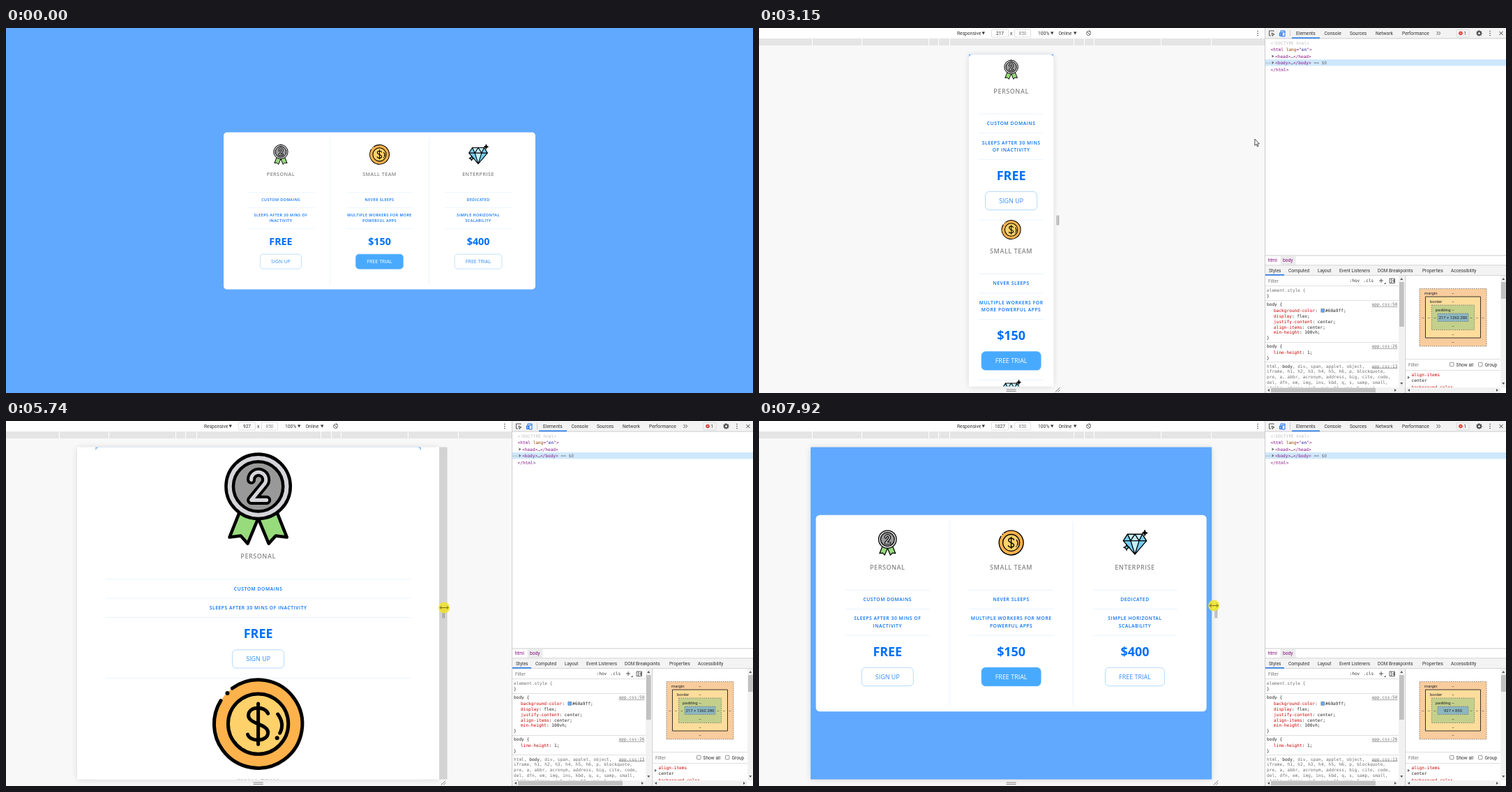
Animation of 1071x523 px, one loop 8000 ms. Source, as an HTML page with a canvas:

```html
<!DOCTYPE html>
<html lang="en">
<head>
<meta charset="utf-8">
<title>Responsive pricing panel</title>
<style>
html, body { margin: 0; width: 100%; height: 100%; overflow: hidden; background: #60a9ff; }
canvas { display: block; }
</style>
</head>
<body>
<canvas id="stage" width="1071" height="523"></canvas>
<script>
const c = document.getElementById('stage').getContext('2d');
const LOOP = 8000, ZOOM = 0.56, MID = 361.6, TOP = 37.5, VIEW_H = 850;
const SANS = 'Roboto, sans-serif', OPEN = '"Open Sans", sans-serif', MONO = '"DejaVu Sans Mono", monospace';
const BLUE = '#60a9ff', RULE = '#e1f1ff', GRAY = '#6e6e6e', DARK = '#333', EDGE = '#ccc', PURPLE = '#881280';

const PLANS = [
  { name: 'PERSONAL', icon: medal, price: 'FREE', button: 'SIGN UP',
    features: ['CUSTOM DOMAINS', 'SLEEPS AFTER 30 MINS OF INACTIVITY'] },
  { name: 'SMALL TEAM', icon: coin, price: '$150', button: 'FREE TRIAL', featured: true,
    features: ['NEVER SLEEPS', 'MULTIPLE WORKERS FOR MORE POWERFUL APPS'] },
  { name: 'ENTERPRISE', icon: diamond, price: '$400', button: 'FREE TRIAL',
    features: ['DEDICATED', 'SIMPLE HORIZONTAL SCALABILITY'] }
];

// [time, value...] keys, linear in between
const POINTER = [[360, 93, 33], [980, 648, 120], [1130, 604, 114], [1210, 616, 103], [1280, 635, 91],
  [1680, 635, 91], [2450, 674, 277], [2990, 674, 277], [3300, 745, 50], [3630, 709, 140],
  [3780, 709, 140], [3790, 697, 166], [4230, 425, 275]];
const WIDTH = [[5020, 217], [5090, 231], [5740, 927], [5870, 934], [6650, 1180], [6980, 1211],
  [7200, 1205], [7540, 1148], [7920, 1027]];
const GRIP = [[4850, 3, 275], [5090, 5, 275], [5740, 7, 267.5], [6980, 5, 265], [7920, 3, 264.5]];

function at(keys, t) {
  if (t <= keys[0][0]) return keys[0].slice(1);
  const i = keys.findIndex(k => k[0] > t);
  if (i < 0) return keys[keys.length - 1].slice(1);
  const a = keys[i - 1], b = keys[i], p = (t - a[0]) / (b[0] - a[0]);
  return a.slice(1).map((v, n) => v + (b[n + 1] - v) * p);
}

function rect(x, y, w, h, color) { c.fillStyle = color; c.fillRect(x, y, w, h); }
function box(x, y, w, h, r, fill, stroke, lw = 1) {
  c.beginPath(); c.roundRect(x, y, w, h, r);
  if (fill) { c.fillStyle = fill; c.fill(); }
  if (stroke) { c.strokeStyle = stroke; c.lineWidth = lw; c.stroke(); }
}
function shape(d, fill, stroke, lw = 1) {
  const p = new Path2D(d);
  if (fill) { c.fillStyle = fill; c.fill(p); }
  if (stroke) { c.strokeStyle = stroke; c.lineWidth = lw; c.stroke(p); }
}
function disc(x, y, r, fill, stroke, lw) { box(x - r, y - r, 2 * r, 2 * r, r, fill, stroke, lw); }
function setFont(size, font, weight, gap) {
  c.font = `${weight} ${size}px ${font}`;
  c.letterSpacing = gap + 'px';
}
// y is the middle of the capitals
function text(s, x, y, size, color, { font = SANS, weight = 400, align = 'left', gap = 0 } = {}) {
  setFont(size, font, weight, gap);
  c.textAlign = align;
  c.fillStyle = color;
  c.fillText(s, x, y + size * 0.36);
  return c.measureText(s).width;
}
function moved(x, y, scale, draw) {
  c.save(); c.translate(x, y); c.scale(scale, scale); draw(); c.restore();
}

// Icons are drawn around 0,0 in a box of 131 units
function medal() {
  shape('M-27 20L-41 55L-25 53L-15 64L0 28L15 64L25 53L41 55L27 20Z', '#98db7c', '#000', 4.5);
  disc(0, -17.5, 46, '#d5d5da', '#000', 4.5);
  disc(0, -17.5, 35.5, '#999', '#000', 4.5);
  const two = 'M-10 -27A10.5 10.5 0 1 1 8 -20L-10 2H12';
  shape(two, null, '#000', 13);
  shape(two, null, '#d5d5da', 5);
}
function coin() {
  disc(0, 0, 63, '#feb24c');
  c.beginPath(); c.arc(0, 0, 63, -2.2, 3.7);
  c.strokeStyle = '#000'; c.lineWidth = 5; c.stroke();
  disc(-44, -44, 3, '#000');
  disc(0, 0, 43, '#fed16a', '#000', 5);
  shape('M14 -15C10 -26 -14 -26 -14 -12C-14 0 14 0 14 12C14 26 -12 26 -15 15M0 -29V29', null, '#000', 5);
  shape('M28 -14Q38 0 31 13', null, '#000', 5);
  disc(27, 20, 3, '#000');
}
function diamond() {
  shape('M-38 -44H38L60 -10L0 60L-60 -10Z', '#74cff5');
  shape('M-38 -44H38L22 -10L0 60L-22 -10Z', '#c4efff');
  shape('M-38 -44H38L60 -10L0 60L-60 -10ZM-60 -10H60M-38 -44L-22 -10L0 -44L22 -10L38 -44M-22 -10L0 60L22 -10', null, '#000', 5);
  const star = 'M0 -15Q2 -2 15 0Q2 2 0 15Q-2 2 -15 0Q-2 -2 0 -15Z';
  moved(51, -50, 1, () => shape(star, '#000', '#000', 3));
  moved(-43, 24, 1, () => shape(star, '#74cff5', '#000', 5));
}

function wrap(s, width) {
  setFont(12, OPEN, 600, 1);
  return s.split(' ').reduce((lines, word) => {
    const last = lines.length - 1, joined = lines[last] + ' ' + word;
    if (last >= 0 && c.measureText(joined).width <= width) lines[last] = joined;
    else lines.push(word);
    return lines;
  }, []);
}

function column(plan, x, top, w) {
  const label = { font: OPEN, weight: 600, align: 'center', gap: 1 };
  const rule = y => rect(x - w / 2, y - 0.7, w, 1.4, RULE);
  moved(x, top + w * 0.15, w * 0.3 / 131, () => { c.lineCap = c.lineJoin = 'round'; plan.icon(); });
  let y = top + w * 0.3 + 30.5;
  text(plan.name, x, y, 16, '#888', label);
  rule(y += 58);
  for (const feature of plan.features) {
    const lines = wrap(feature, w);
    lines.forEach((s, i) => text(s, x, y + 24 + 18 * i, 12, '#016ff9', label));
    rule(y += 31 + 18 * lines.length);
  }
  text(plan.price, x, y + 41.5, 32, '#016ff9', { font: OPEN, weight: 700, align: 'center' });
  setFont(16, OPEN, 400, 0);
  const bw = c.measureText(plan.button).width + 70;
  box(x - bw / 2, y + 82.5, bw, 47, 10, plan.featured ? '#48aaff' : '#fff', plan.featured ? '#48aaff' : '#9dd1ff', 1.4);
  text(plan.button, x, y + 106, 16, plan.featured ? '#fff' : '#348efe', { font: OPEN, align: 'center' });
  return y + 155;
}

function rowPanel(x, y, scale, width) {
  moved(x, y, scale, () => {
    const col = (width - 50) / 3;
    box(-width / 2, -251.5, width, 503, 10, '#fff');
    PLANS.forEach((plan, i) => {
      column(plan, (i - 1) * col, -213, col - 100);
      if (i) rect((i - 1.5) * col - 0.8, -236, 1.6, 472, RULE);
    });
  });
}

function stackedPanel(width) {
  moved(MID, TOP, ZOOM, () => {
    rect(-width / 2, 0, width, 8, BLUE);
    box(-width / 2, 0, width, 1300, 10, '#fff');
    let y = 14.5;
    for (const plan of PLANS) {
      y = column(plan, 0, y, width - 50);
      rect(25 - width / 2, y - 0.7, width - 50, 1.4, RULE);
    }
  });
}

function device(t) {
  const width = at(WIDTH, t)[0], laid = at(WIDTH, t - 89)[0];
  const w = width * ZOOM, left = MID - w / 2, right = MID + w / 2, h = VIEW_H * ZOOM;
  const stacked = laid < 900;
  rect(0, 0, 725, 523, '#f8f8f8');
  c.save();
  c.shadowColor = 'rgba(0,0,0,.14)'; c.shadowBlur = 9;
  rect(left, TOP, w, h, stacked ? '#fff' : BLUE);
  c.restore();
  c.save();
  c.beginPath(); c.rect(left, TOP, w, h); c.clip();
  if (stacked) stackedPanel(laid);
  else rowPanel(MID, TOP + h / 2, ZOOM, Math.min(1000, laid));
  const inspected = t >= 3300 && t < 3870;
  if (inspected) rect(left, TOP, w, h, 'rgba(111,168,220,.66)');
  c.restore();
  if (inspected) bodyTip();

  if (t >= 4700 && t < 7840) rect(right, TOP, 11.5, h, '#d3d3d3');
  for (const d of [4.5, 6.7]) rect(right + d, 268.5, 1, 14, '#888');
  for (const y of [517.5, 520]) rect(MID - 7, y, 14, 1, '#888');
  shape(`M${right + 2.5} 521.5L${right + 9} 515.5M${right + 6} 521.5L${right + 9} 518.5`, null, '#777', 1);

  rect(0, 0, 725, 15, '#fff');
  rect(0, 15, 725, 10, '#e5e5e5');
  for (const x of [76, 147, 243, 257, 273, 451, 466, 480, 576, 648]) rect(x, 15, 1, 10, '#fff');
  const ui = (s, x) => text(s, x, 7.8, 6.7, DARK);
  const caret = x => shape(`M${x} 5.5h4.4l-2.2 4z`, DARK);
  ui('Responsive', 284); caret(319.5);
  ui('100%', 400); caret(418);
  ui('Online', 429.5); caret(451);
  ui('x', 360);
  box(333.5, 2, 24, 11, 1, '#fff', '#e0e0e0');
  box(366.5, 2, 23, 11, 1, '#fff', '#e0e0e0');
  text(String(Math.round(width)), 345.5, 7.8, 6.6, DARK, { align: 'center' });
  text('850', 378, 7.8, 6.6, '#888', { align: 'center' });
  disc(472.5, 7.5, 3, null, '#555', 0.9);
  shape('M470.5 5.5l4 4M473 3.5l2.5 2', null, '#555', 1);
  dots(715);
}

function dots(x) { for (const y of [4.5, 7.5, 10.5]) disc(x, y, 0.8, '#444'); }

function bodyTip() {
  c.save();
  c.shadowColor = 'rgba(0,0,0,.35)'; c.shadowBlur = 3;
  box(302.5, 497, 91.5, 16, 1.5, '#fff');
  c.restore();
  for (const x of [308.5, 312.5]) for (const y of [502, 506]) rect(x, y, 3, 3, '#5b9be8');
  text('body', 321.5, 505.5, 6.8, PURPLE, { weight: 700, font: OPEN });
  text('217 × 1262.28', 345, 505.5, 6.7, GRAY);
}

function run(x, y, ...parts) {
  for (let i = 0; i < parts.length; i += 2) x += text(parts[i], x, y, 6.15, parts[i + 1], { font: MONO });
}

function scrollV(x, top, bottom, thumb, size) {
  rect(x, top, 8, bottom - top, '#f1f1f1');
  rect(x + 0.7, thumb, 6.8, size, '#c1c1c1');
  shape(`M${x + 2} ${top + 6}h4l-2 -3z`, '#555');
  shape(`M${x + 2} ${bottom - 7}h4l-2 3z`, '#555');
}

function devtools(t) {
  rect(725, 0, 346, 523, '#fff');
  rect(726, 0, 345, 15, '#f3f3f3');
  rect(726, 14.5, 345, 1, EDGE);
  shape('M738 5V4H731.5V11H734M735 7l4 2-2 .7-.7 2z', null, '#555', 1);
  shape('M748 11V4h6v2M746.5 7h3v4.5h-3zM750 6h4v6h-4z', null, '#1a73e8', 1);
  rect(761, 3, 1, 9, EDGE);
  rect(764, 13.5, 40, 1.5, '#1a73e8');
  [['Elements', 770], ['Console', 810.5], ['Sources', 847], ['Network', 884], ['Performance', 922]]
    .forEach(([s, x]) => text(s, x, 7.8, 6.7, DARK));
  shape('M971.5 5l2.3 2.5-2.3 2.5M974.5 5l2.3 2.5-2.3 2.5', null, '#555', 1);
  box(1000, 2.5, 18, 10.5, 1.5, '#f3f3f3', '#d5d5d5', 0.8);
  disc(1006, 7.5, 2.8, '#d93a32');
  shape('M1005 6.5l2 2m0-2l-2 2', null, '#fff', 0.7);
  text('1', 1010.5, 7.8, 6.7, DARK);
  disc(1032.5, 7.5, 2.4, null, '#444', 1.8);
  c.setLineDash([1.2, 1.4]); disc(1032.5, 7.5, 3.7, null, '#444', 1.2); c.setLineDash([]);
  dots(1048);
  shape('M1061.5 5l5 5m0-5l-5 5', null, '#444', 1);

  // document tree
  rect(726, 45, 345, 9.3, '#cfe8fc');
  const arrow = y => shape(`M735.5 ${y - 2.2}v4.4l3-2.2z`, GRAY);
  run(733.5, 21.8, '<!DOCTYPE html>', '#c0c0c0');
  run(733.5, 31.2, '<html ', PURPLE, 'lang', '#994500', '="', PURPLE, 'en', '#1a1aa6', '">', PURPLE);
  arrow(40.5); run(740, 40.7, '<head>', PURPLE, '…', DARK, '</head>', PURPLE);
  arrow(49.8); run(740, 50, '<body>', PURPLE, '…', DARK, '</body>', PURPLE, ' == $0', GRAY);
  for (const x of [727.5, 730, 732.5]) disc(x, 50, 0.6, GRAY);
  run(733.5, 59.6, '</html>', PURPLE);

  // breadcrumb and side tabs
  rect(726, 325.5, 345, 1, EDGE);
  rect(747.5, 327, 22, 12.5, '#ececec');
  text('html', 729.5, 333, 6.7, PURPLE);
  text('body', 751, 333, 6.7, PURPLE);
  rect(726, 339.5, 345, 15, '#f3f3f3');
  rect(726, 339.5, 345, 0.8, EDGE);
  rect(726, 354, 345, 0.8, EDGE);
  rect(726, 353, 27, 1.5, '#1a73e8');
  [['Styles', 731], ['Computed', 759], ['Layout', 801], ['Event Listeners', 832], ['DOM Breakpoints', 887],
    ['Properties', 951], ['Accessibility', 992]].forEach(([s, x]) => text(s, x, 347.5, 6.5, DARK));

  stylesPane();
  boxModel(t);
  rect(725, 0, 1, 523, EDGE);
}

function stylesPane() {
  text('Filter', 730, 362.5, 6.6, '#777');
  run(846.5, 362, ':hov', DARK); run(866.5, 362, '.cls', DARK);
  shape('M889 362h6M892 359v6', null, '#444', 0.9);
  shape('M898.5 364.5v2.5h-2.5z', '#444');
  shape('M904 359h7.5v6.5H904zM906.5 359v6.5M910.5 360.5l-2.3 1.8 2.3 1.8z', null, '#555', 0.9);
  for (const y of [369, 390, 450, 478]) rect(726, y, 191, 0.8, '#d8d8d8');
  const link = (s, y) => {
    text(s, 915.5, y, 6.15, GRAY, { font: MONO, align: 'right' });
    rect(878.5, y + 3, 37, 0.6, GRAY);
  };
  const prop = (name, value, y) => run(738, y, name, '#c80000', ': ' + value + ';', '#222');
  run(728, 375.5, 'element.style {', GRAY);
  run(728, 384, '}', '#222');
  run(728, 396.2, 'body {', '#222'); link('app.css:50', 396.2);
  run(738, 405, 'background-color', '#c80000', ':', '#222');
  box(805.8, 402.3, 5, 5, 0, BLUE, '#777', 0.6);
  run(812, 405, '#60a9ff;', '#222');
  prop('display', 'flex', 412.8);
  prop('justify-content', 'center', 420.6);
  prop('align-items', 'center', 428.4);
  prop('min-height', '100vh', 436.2);
  run(728, 444, '}', '#222');
  run(728, 456, 'body {', '#222'); link('app.css:26', 456);
  prop('line-height', '1', 464.6);
  run(728, 472.8, '}', '#222');
  run(728, 484.3, 'html, ', GRAY, 'body', '#222', ', div, span, applet, object,', GRAY); link('app.css:13', 484.3);
  ['iframe, h1, h2, h3, h4, h5, h6, p, blockquote,', 'pre, a, abbr, acronym, address, big, cite, code,',
    'del, dfn, em, img, ins, kbd, q, s, samp, small,', 'strike, strong, sub, sup, tt, var, b, u, i,']
    .forEach((s, i) => run(728, 492 + 7.8 * i, s, GRAY));
  rect(726, 515, 200, 8, '#f1f1f1');
  rect(734, 515.7, 150, 6.5, '#c1c1c1');
  shape('M732 517v4l-3-2zM911 517v4l3-2z', '#555');
  scrollV(917.3, 355, 515, 364, 64);
  rect(926, 355, 1, 168, EDGE);
}

function boxModel(t) {
  const mid = { align: 'center' };
  const frame = (x, y, w, h, fill, dashed) => {
    if (dashed) c.setLineDash([1.5, 1.5]);
    box(x, y, w, h, 0, fill, dashed ? '#777' : '#222', 0.9);
    c.setLineDash([]);
  };
  frame(947, 373.5, 96, 82.5, '#f9cc9d', true);
  frame(955.5, 385, 79, 59, '#fddd9b');
  frame(964.5, 397, 61, 35.5, '#c3d08b', true);
  frame(973, 409, 44, 11.5, '#8cb6c0', true);
  [['margin', 954, 379.5, 450], ['border', 962, 391.5, 438.5], ['padding', 970, 403.5, 427]].forEach(([s, x, y, low], i) => {
    text(s, x, y, 6, '#222');
    for (const dash of [[995, y], [995, low], [952 + 8.5 * i, 415], [1038 - 8.5 * i, 415]])
      text('–', ...dash, 6, '#222', mid);
  });
  text(t < 5870 ? '217 × 1262.280' : '927 × 850', 995, 415, 5.9, '#222', mid);
  rect(927, 474, 136, 0.8, '#d8d8d8');
  rect(927, 490, 136, 0.8, '#d8d8d8');
  text('Filter', 931, 482.8, 6.6, '#777');
  [['Show all', 990.5], ['Group', 1031.5]].forEach(([s, x]) => {
    box(x, 479.3, 5.5, 5.5, 1, '#fff', '#777', 0.8);
    text(s, x + 9, 482.6, 6.6, DARK);
  });
  shape('M930 498.5v4.4l3-2.2z', GRAY);
  run(935.5, 496.5, 'align-items', '#c80000');
  run(935.5, 504.5, 'center', '#222');
  run(935.5, 514.5, 'background-color', '#c80000');
  rect(927, 515, 144, 8, '#fff');
  rect(927, 515, 136, 8, '#f1f1f1');
  shape('M933 517v4l-3-2zM1057 517v4l3-2z', '#555');
  scrollV(1063.3, 355, 515, 364, 24);
}

const MENU = [['Back', 100, 'Alt+Left Arrow', true], ['Forward', 113, 'Alt+Right Arrow', true], ['Reload', 126, 'Ctrl+R'],
  ['Save as...', 145, 'Ctrl+S'], ['Print...', 157.7, 'Ctrl+P'], ['Cast...', 170.5],
  ['Send to your devices', 189.7, '▸'], ['Create QR code for this page', 203.2], ['Translate to español', 222.8],
  ['CalmGrove - Keep Working  Manage Your Day', 241.6, '▸'], ['View page source', 260.6, 'Ctrl+U'], ['Inspect', 273.5, 'Ctrl+Shift+I']];

function menu(alpha, pointerY) {
  c.save();
  c.globalAlpha = alpha;
  rect(638, 94, 222, 189, 'rgba(20,30,50,.6)');
  box(635.5, 91.5, 223, 189.5, 0, '#fff', '#b5b5b5', 1);
  for (const y of [134.5, 180, 212.5, 232, 251]) rect(637, y - 0.5, 220.5, 1, '#dedede');
  for (const [s, y, key, off] of MENU) {
    if (Math.abs(pointerY - y) < 6.4) rect(636, y - 6.4, 222, 12.8, '#c1c1c1');
    const color = off ? '#777' : '#111';
    text(s, 657, y, 6.3, color, { font: OPEN });
    if (key === '▸') shape(`M850.5 ${y - 3}v5l2.8-2.5z`, '#222');
    else if (key) text(key, 844, y, 6.3, off ? '#777' : '#333', { font: OPEN, align: 'right' });
  }
  shape('M642 191v-4h7v1M641 192h5M646.5 189h2.5v3.5h-2.5z', null, '#444', 0.9);
  for (const [x, y] of [[641.5, 199.5], [646, 199.5], [641.5, 204], [646, 204]]) box(x, y, 2.8, 2.8, 0, null, '#333', 1.1);
  disc(645, 241.3, 3.8, '#de6a58');
  c.restore();
}

function glow(x, y) { disc(x, y, 8, 'rgba(240,226,45,.88)'); }

function draw(t) {
  const [x, y] = at(POINTER, t);
  if (t < 2990) {
    rect(0, 0, 1071, 523, BLUE);
    rowPanel(535.5, 262, 0.447, 1000);
    if (t >= 1680 && t < 1800) glow(x, y);
    if (t >= 1680 && t < 2760) menu(Math.min(1, (t - 1600) / 160, (2760 - t) / 80), y);
  } else {
    device(t);
    devtools(t);
  }
  if (t < 360) return;
  if (t < 4230) {
    moved(x, y, 1, () => shape('M0 0V9.2L2.1 7.3L3.6 10.8L5.1 10.2L3.6 6.8H6.5Z', '#fff', '#222', 0.8));
    return;
  }
  const [offset, gy] = at(GRIP, t), gx = MID + at(WIDTH, t)[0] * ZOOM / 2 + offset;
  if (t >= 4700) glow(gx, gy);
  moved(gx, gy, 1, () => shape('M-6 0H6M-3.5 -2.5L-6 0L-3.5 2.5M3.5 -2.5L6 0L3.5 2.5', null, '#6b6414', 0.9));
}

function frame(now) {
  c.lineCap = 'butt'; c.lineJoin = 'miter';
  draw(now % LOOP);
  requestAnimationFrame(frame);
}
requestAnimationFrame(frame);
</script>
</body>
</html>
```
